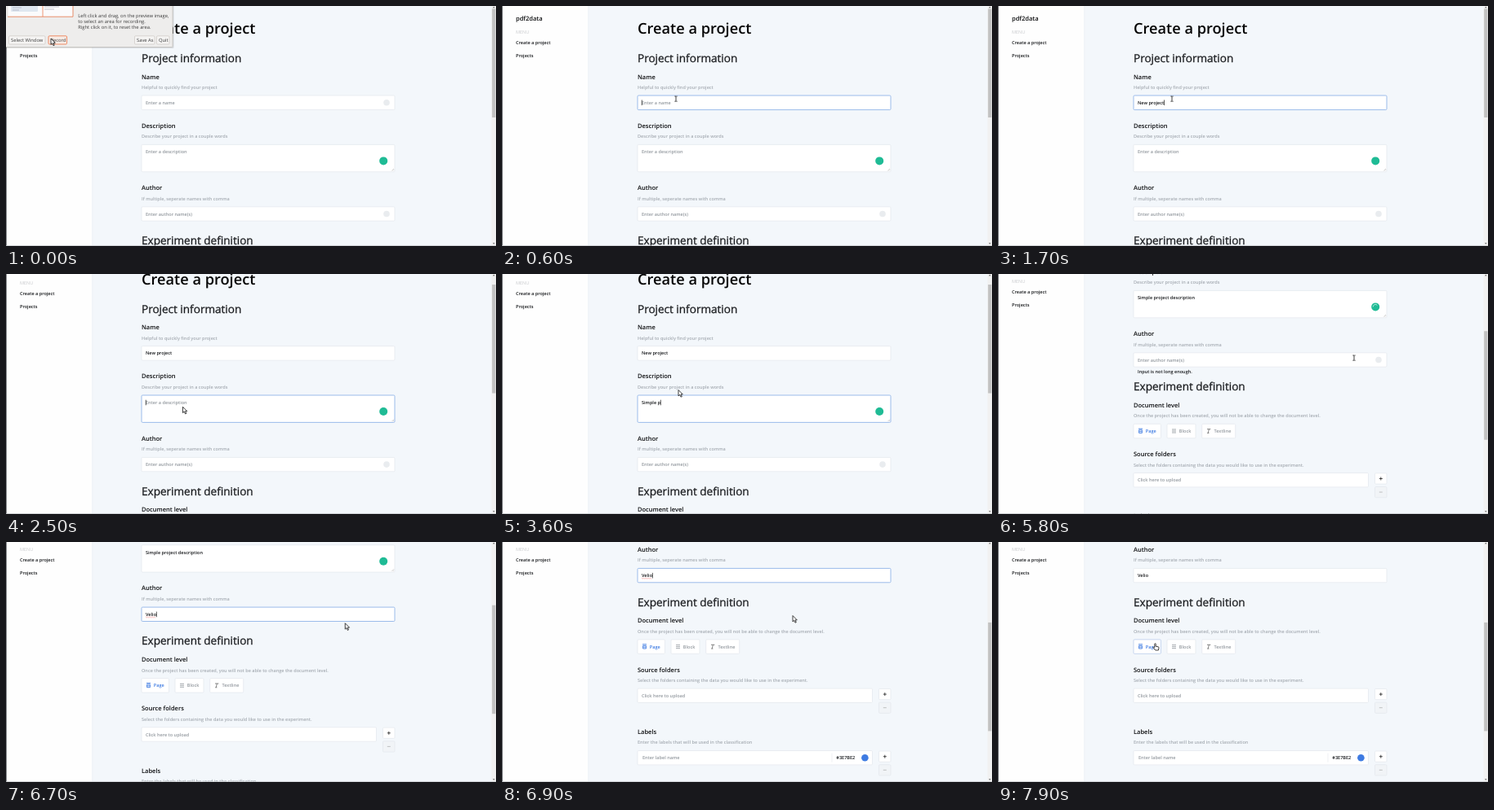
Write an HTML page that moves like this. It is 600 by 295 pixels and loops after 8000 ms.

```html
<!DOCTYPE html>
<html lang="en">
<head>
<meta charset="utf-8">
<title>Create a project</title>
<style>
  html, body { margin: 0; width: 100%; height: 100%; overflow: hidden; background: #f3f7fb; }
  svg { display: block; width: 100vw; height: 100vh; }
  text { font-family: "Open Sans", "Noto Sans", sans-serif; font-size: 5.55px; font-weight: 600;
         fill: #16181b; text-rendering: geometricPrecision; white-space: pre; }
  .title { font-size: 18.2px; fill: #050505; }
  .heading { font-size: 13.55px; font-weight: 400; fill: #1b1d20; stroke: #1b1d20; stroke-width: .3; }
  .label { font-size: 7.5px; fill: #0c0d0f; }
  .hint { fill: #a5abb2; }
  .ghost { fill: #92989e; }
  .menu { fill: #c9cbce; font-weight: 400; }
  .blue { fill: #3e7be2; }
  .dialog { font-size: 5.8px; font-weight: 400; fill: #3c3c3c; }
  .box { fill: #fff; stroke: #e2e7ec; stroke-width: .7; }
  .dim { fill: #f1f4f7; stroke: #e2e7ec; stroke-width: .7; }
  .button { fill: #f5f4f3; stroke: #c6c2bd; stroke-width: .6; }
</style>
</head>
<body>
<svg id="stage" viewBox="0 0 600 295" preserveAspectRatio="none"></svg>
<script>
const LOOP = 8000, FRAME = 100;
const stage = document.getElementById('stage');
const $ = id => document.getElementById(id);

const text = (x, y, str, cls = '', id = '') =>
  `<text x="${x}" y="${y}" class="${cls}" ${id && `id="${id}"`}>${str}</text>`;
const rect = (x, y, w, h, attrs = 'class="box"') =>
  `<rect x="${x}" y="${y}" width="${w}" height="${h}" rx="1.2" ${attrs}/>`;
const heading = (y, str) => text(166, y, str, 'heading');
const section = (y, label, hint) => text(166, y, label, 'label') + text(166, y + 12.4, hint, 'hint');
const adders = y => rect(461.5, y, 14.5, 13.3) + rect(461.5, y + 16.7, 14.5, 13.3, 'class="dim"') +
  `<path d="M466.8 ${y + 6.7}h4m-2 -2v4" stroke="#222" stroke-width=".8"/>
   <path d="M466.8 ${y + 23.3}h4" stroke="#aaa" stroke-width=".7"/>`;

// A text input with placeholder, typed value, caret and optional badge.
const input = (id, y, h, placeholder, base, badge) =>
  rect(166, y, 310, h, `class="box" id="${id}Box"`) +
  text(171, base, placeholder, 'ghost', id + 'Ghost') + text(171, base, '', '', id + 'Text') +
  `<path id="${id}Caret" stroke="#111" stroke-width=".7"/>` +
  (badge ? `<circle id="${id}Badge" cx="466" cy="${y + h / 2}" r="3.8" fill="#e9ecef"/>` : '');

const levels = [
  { id: 'levelPage', x: 166, w: 33.5, name: 'Page', cls: 'blue',
    icon: '<path d="M172 340.2h5m-4.4 1.6h3.8v3.6h-3.8zm.6 1.8h2.6" fill="none" stroke="#3e7be2" stroke-width=".9"/>' },
  { id: 'levelBlock', x: 207, w: 35, name: 'Block', cls: 'ghost',
    icon: '<path d="M213 341h5m-5 2h5m-5 2h5" stroke="#8f959b" stroke-width=".8"/>' },
  { id: 'levelLine', x: 249.7, w: 41, name: 'Textline', cls: 'ghost',
    icon: '<path d="M256 340.7h4.4m-2 0l-1.2 4.8m-1 0h2.2" fill="none" stroke="#777" stroke-width=".9"/>' }
];
const levelButton = b => rect(b.x, 334.3, b.w, 17.5, `class="box" id="${b.id}"`) + b.icon +
  text(b.x + 14.8, 345.1, b.name, b.cls);

const content =
  text(166, 34.3, 'Create a project', 'title') +
  heading(69, 'Project information') +
  section(89.7, 'Name', 'Helpful to quickly find your project') +
  input('name', 110, 17.6, 'Enter a name', 120.7, true) +
  section(149.8, 'Description', 'Describe your project in a couple words') +
  input('desc', 170.4, 33.4, 'Enter a description', 181.3) +
  `<path d="M472.5 202.5l2.5-2.5m-1 2.5l1-1" stroke="#888" stroke-width=".4"/>
   <circle cx="462.2" cy="190.4" r="5" fill="#1fbb95"/>
   <path id="spinner" d="M459.2 190.4a3 3 0 0 1 5.1-2.1" fill="none" stroke="#d6f5ec" stroke-width=".8"/>` +
  section(226.2, 'Author', 'If multiple, seperate names with comma') +
  input('author', 246.8, 17.4, 'Enter author name(s)', 257.5, true) +
  '<path id="spelling" fill="none" stroke="#e66" stroke-width=".5"/>' +
  text(171, 272, 'Input is not long enough.', '', 'warning') +
  heading(293.2, 'Experiment definition') +
  section(313.9, 'Document level', 'Once the project has been created, you will not be able to change the document level.') +
  levels.map(levelButton).join('') +
  section(374.2, 'Source folders', 'Select the folders containing the data you would like to use in the experiment.') +
  rect(166, 394.5, 287.5, 17.4) + text(171, 405.3, 'Click here to upload', 'ghost') + adders(394.8) +
  section(450.4, 'Labels', 'Enter the labels that will be used in the classification') +
  rect(166, 470.9, 287.5, 17.4) + text(172, 481.7, 'Enter label name', 'ghost') +
  '<path d="M404 474v11" stroke="#e2e7ec" stroke-width=".6"/>' + text(409.3, 481.7, '#3E7BE2') +
  '<circle cx="444.4" cy="479.6" r="4.3" fill="#3e7be2"/>' + adders(471.4);

const sidebar =
  text(17, 17.7, 'pdf2data', 'label') + text(17, 34, 'MENU', 'menu') +
  text(17, 47, 'Create a project') + text(17, 63, 'Projects');

const dialogButton = (x, w, str, attrs = 'class="button"') =>
  rect(x, 36.8, w, 10.2, attrs) + text(x + 2.5, 43.9, str, 'dialog');
const dialog =
  rect(-2, -3, 207.5, 55, 'fill="#000" opacity=".12"') +
  rect(-2, -3, 206, 53.5, 'fill="#eeedec" stroke="#b9b5b0" stroke-width=".6"') +
  rect(2, -3, 80, 16.3, 'fill="#fbfbfc" stroke="#d6d3cf" stroke-width=".5"') +
  rect(6, -3, 33, 10, 'fill="#dfe7f0"') +
  '<path d="M8 2h11m-11 3h8M47 1h18m-18 3h12" stroke="#aab" stroke-width=".7"/>' +
  '<path d="M2 13.2h80V-2M45 13V-2" fill="none" stroke="#ee7f55" stroke-width=".8"/>' +
  ['Left click and drag, on the preview image,', 'to select an area for recording.',
   'Right click on it, to reset the area.'].map((s, i) => text(88.3, 14 + 7.2 * i, s, 'dialog')).join('') +
  dialogButton(3.5, 44.5, 'Select Window') +
  dialogButton(52, 22.5, 'Record', 'fill="#f7ece6" stroke="#ee7f55" stroke-width=".9"') +
  dialogButton(157.5, 24.5, 'Save As') + dialogButton(184.5, 15.5, 'Quit');

const cursors = {
  arrow: '<path d="M0 0v7.4l1.7-1.6 1.3 2.9 1.3-.6-1.3-2.7h2.3z" fill="#fff" stroke="#111" stroke-width=".8"/>',
  beam: '<path d="M-1.6-3h1.2l.4.4.4-.4h1.2M0-2.6v5.4M-1.6 3.2h1.2l.4-.4.4.4h1.2" fill="none" stroke="#111" stroke-width=".8"/>',
  hand: '<path d="M-.7.7q.7-1.2 1.4 0v3l3 .6q.9.3.8 1.2l-.6 3h-3.7l-2.6-3.3q0-1.2 1.7-.2z" fill="#fff" stroke="#111" stroke-width=".8"/>'
};

stage.innerHTML =
  '<rect width="600" height="295" fill="#f3f7fb"/><rect width="105.6" height="295" fill="#fefefe"/>' +
  '<path d="M105.8 0v295" stroke="#e6ebf0" stroke-width=".6"/>' +
  `<g id="content">${content}</g><g id="sidebar">${sidebar}</g>` +
  '<rect x="594.6" width="5.4" height="295" fill="#f1f1f1"/>' +
  '<path d="M596 2.2l1.3-1.5 1.3 1.5zM596 291.3l1.3 1.5 1.3-1.5z" fill="#555"/>' +
  '<rect id="thumb" x="595.2" width="4.2" height="133.5" fill="#c1c1c1"/>' +
  '<path d="M.4 0v295" stroke="#55585c" stroke-width=".8"/><path d="M0 294.6h600" stroke="#c4c7ca" stroke-width=".8"/>' +
  `<g id="dialog">${dialog}</g>` +
  Object.entries(cursors).map(([k, v]) => `<g id="${k}">${v}</g>`).join('');

const show = (id, on) => $(id).setAttribute('visibility', on ? 'visible' : 'hidden');
const move = (id, x, y) => $(id).setAttribute('transform', `translate(${x} ${y})`);

// Eased value of a list of [time, ...values] keys.
function track(t, keys) {
  const next = keys.findIndex(k => k[0] > t);
  if (next < 0) return keys.at(-1).slice(1);
  if (next === 0) return keys[0].slice(1);
  const a = keys[next - 1], b = keys[next];
  const u = (t - a[0]) / (b[0] - a[0]), e = u * u * (3 - 2 * u);
  return a.slice(1).map((v, i) => v + (b[i + 1] - v) * e);
}

const scrollKeys = [[2000, 0], [2500, 21.4], [5100, 21.4], [5600, 150], [6600, 150], [6900, 214.4]];
const pointerKeys = [
  [0, 55, 40], [400, 213, 114], [1700, 213, 114], [1900, 217, 184], [2100, 217, 184], [2900, 216, 142.5],
  [4800, 216, 142.5], [5100, 275, 113], [5200, 275, 113], [5700, 436, 103], [6600, 436, 103],
  [6900, 356, 90.5], [7200, 270, 125], [7300, 270, 125], [7900, 192.5, 124.5]
];
const shapeAt = t =>
  t >= 7200 ? 'hand' : (t >= 400 && t < 2300) || (t >= 5700 && t < 6700) ? 'beam' : 'arrow';

const fields = [
  { id: 'name', value: 'New project', base: 120.7, focus: 600, blur: 1900, type: [1100, 1600] },
  { id: 'desc', value: 'Simple project description', base: 181.3, focus: 1900, blur: 5800, type: [3000, 4800] },
  { id: 'author', value: 'Velio', base: 257.5, focus: 5900, blur: 7200, type: [6000, 6500] }
];

function drawField(f, t) {
  const [start, end] = f.type;
  const part = Math.min(1, Math.max(0, (t - start) / (end - start)));
  const typed = f.value.slice(0, Math.floor(part * f.value.length));
  const focused = t >= f.focus && t < f.blur;
  const typing = t >= start && t <= end + 400;
  const caretOn = typing || (t - f.focus) % 600 < 300;
  const label = $(f.id + 'Text'), box = $(f.id + 'Box');
  label.textContent = typed;
  const right = 171.3 + (typed ? label.getComputedTextLength() : 0);
  show(f.id + 'Ghost', !typed);
  $(f.id + 'Caret').setAttribute('d', `M${right} ${f.base - 5.2}v6.6`);
  show(f.id + 'Caret', focused && caretOn);
  box.style.stroke = focused ? '#9bbbea' : '';
  box.style.strokeWidth = focused ? 1 : '';
  if (f.id !== 'desc') show(f.id + 'Badge', !typed && !focused);
  return { typed, right, focused };
}

function draw(t) {
  const [scroll] = track(t, scrollKeys);
  const [x, y] = track(t, pointerKeys);
  move('content', 0, -scroll);
  move('sidebar', 0, -Math.min(scroll, 22.6));
  $('thumb').setAttribute('y', 3.5 + scroll * .445);
  show('dialog', t < 100);

  const author = fields.map(f => drawField(f, t)).at(-1);
  const waves = Math.floor((author.right - 171) / 2);
  $('spelling').setAttribute('d', 'M171 259.2' + 'q.5-.8 1 0t1 0'.repeat(waves));
  show('spelling', author.focused && author.typed);
  show('warning', t >= 5800 && author.typed.length < 3);

  show('spinner', t >= 3800 && t < 6600);
  $('spinner').setAttribute('transform', `rotate(${(t - 5800) * -.1} 462.2 190.4)`);

  for (const b of levels) {
    const hover = t >= 7200 && x >= b.x && x <= b.x + b.w;
    $(b.id).style.stroke = hover ? '#b3c8ea' : '';
  }
  const shape = shapeAt(t);
  for (const k in cursors) show(k, k === shape);
  move(shape, x, y);
}

const began = performance.now();
function tick() {
  const t = (performance.now() - began) % LOOP;
  draw(Math.floor(t / FRAME) * FRAME);
  requestAnimationFrame(tick);
}
tick();
</script>
</body>
</html>
```
